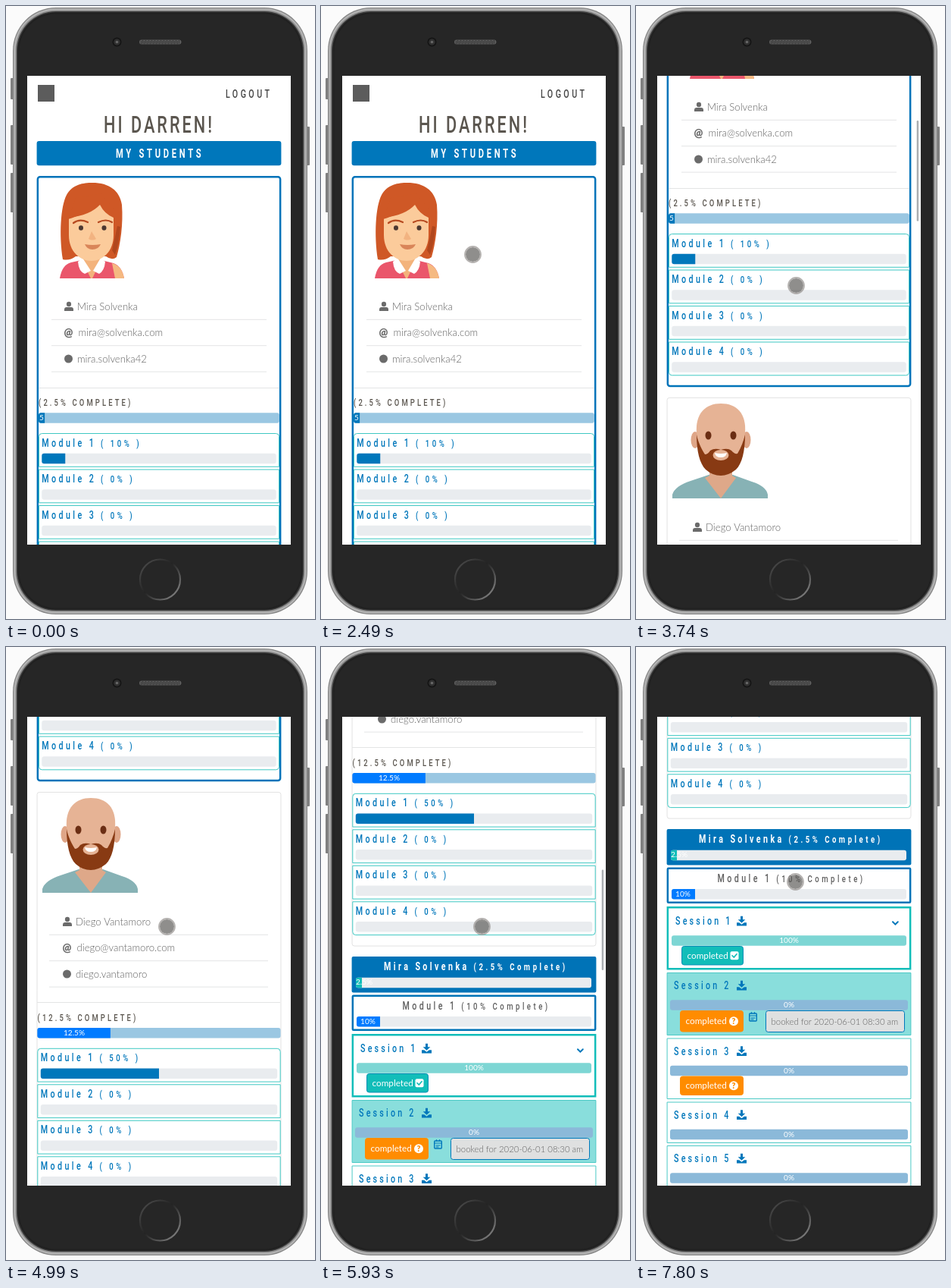
These frames come from a looping animation (408x808 px, 8000 ms). An HTML page with a canvas:

```html
<!DOCTYPE html>
<html lang="en">
<head>
<meta charset="utf-8">
<title>Student overview on a phone</title>
<style>
html, body { margin: 0; width: 100%; height: 100%; overflow: hidden; background: #fbfbfb; }
canvas { display: block; }
</style>
</head>
<body>
<canvas id="stage" width="408" height="808"></canvas>
<script>
const ctx = document.getElementById('stage').getContext('2d');
const LOOP = 8000;
const BLUE = '#0077bb', BRIGHT = '#007bff', TEAL = '#12bdb9', TRACK = '#e9ecef';
const PALE = '#9ac7e2', ORANGE = '#ff8c00', INK = '#5b564f', GREY = '#6b6b6b', SOFT = '#626262';
const CONDENSE = 0.7;
const LEFT = 40.6, WIDTH = 322.8;

// Each track holds its value until the next time.
const scrollTrack = [[0, 0], [2810, 84], [3120, 168], [3420, 252], [3740, 263], [4060, 420],
  [4360, 588], [5310, 672], [5620, 798], [5930, 924], [6240, 1008], [6550, 1092]];
const barTrack = [[0, 0], [2810, 1], [4680, 0.5], [4990, 0], [5310, 1], [6860, 0.5], [7180, 0]];
const cursorTrack = [[0, null], [610, [167.5, 367.5]], [930, [174.5, 193.5]], [1230, [178.5, 189.5]],
  [1550, [198.5, 187.5]], [1870, [224.5, 209.5]], [2170, [143.5, 282.5]], [2490, [200.5, 327.5]],
  [2810, [211.5, 368.5]], [4360, [212.5, 368.5]], [7180, [69.5, 322.5]], [7500, [57.5, 322.5]],
  [7800, [210.5, 309.5]]];

const valueAt = (track, t) => track.filter(step => step[0] <= t).pop()[1];

function box(x, y, w, h, r, fill, stroke, weight = 1) {
  ctx.beginPath();
  ctx.roundRect(x, y, w, h, r);
  if (fill) { ctx.fillStyle = fill; ctx.fill(); }
  if (stroke) { ctx.strokeStyle = stroke; ctx.lineWidth = weight; ctx.stroke(); }
}

// Full-width panel whose border lies inside its bounds.
function panel(y, h, r, fill, stroke, weight) {
  box(LEFT + weight / 2, y + weight / 2, WIDTH - weight, h - weight, r, fill, stroke, weight);
}

function oval(x, y, rx, ry, fill) {
  ctx.beginPath();
  ctx.ellipse(x, y, rx, ry, 0, 0, Math.PI * 2);
  ctx.fillStyle = fill;
  ctx.fill();
}

function shape(d, fill, x = 0, y = 0) {
  ctx.save();
  ctx.translate(x, y);
  ctx.fillStyle = fill;
  ctx.fill(new Path2D(d));
  ctx.restore();
}

function outline(d, color, weight, x = 0, y = 0) {
  ctx.save();
  ctx.translate(x, y);
  ctx.strokeStyle = color;
  ctx.lineWidth = weight;
  ctx.lineCap = 'round';
  ctx.stroke(new Path2D(d));
  ctx.restore();
}

// Condensed, widely tracked lettering; returns the advance.
function narrow(str, x, y, size, color, weight = 500, gap = 3.4) {
  ctx.save();
  ctx.translate(x, y);
  ctx.scale(CONDENSE, 1);
  ctx.font = `${weight} ${size}px Roboto, sans-serif`;
  ctx.letterSpacing = gap / CONDENSE + 'px';
  ctx.fillStyle = color;
  ctx.fillText(str, 0, 0);
  const advance = ctx.measureText(str).width * CONDENSE;
  ctx.restore();
  return advance;
}

function heading(label, note, x, y, color, weight = 500) {
  const advance = narrow(label, x, y, 15.3, color, weight);
  narrow(' ' + note, x + advance, y, 13.7, color, weight, 3.5);
}

function plain(str, x, y, size, color, weight = 300, align = 'left') {
  ctx.font = `${weight} ${size}px Lato, sans-serif`;
  ctx.textAlign = align;
  ctx.fillStyle = color;
  ctx.fillText(str, x, y);
  ctx.textAlign = 'left';
}

function rule(x1, x2, y) {
  ctx.fillStyle = '#e3e4e5';
  ctx.fillRect(x1, y - 0.5, x2 - x1, 1);
}

function progress(x, y, w, track, done = 0, color = BLUE) {
  box(x, y, w, 13.5, 3, track);
  if (done) box(x, y, done, 13.5, [3, 0, 0, 3], color);
}

function barLabel(str, x, y) {
  plain(str, x, y + 9.7, 10.1, '#fff', 400, 'center');
}

function contacts(x, y, lines, left, right) {
  shape('M0 12V10Q0 7 3 7H9Q12 7 12 10V12Z', GREY, x, y - 6);
  oval(x + 6, y - 3, 3.1, 3.2, GREY);
  plain('@', x - 0.5, y + 38.5, 14, GREY, 900);
  oval(x + 5.5, y + 69, 5.5, 5.5, GREY);
  lines.forEach((line, i) => {
    plain(line, x + (i === 1 ? 18.5 : 17), y + 4.7 + i * 34.5, 13.2, SOFT);
    rule(left, right, y + 17.3 + i * 34.4);
  });
}

function modules(x, y, w, pad, firstDone) {
  for (let i = 0; i < 4; i++) {
    const top = y + i * 47.5;
    const r = i === 0 ? [4, 4, 0, 0] : i === 3 ? [0, 0, 4, 4] : 0;
    box(x, top, w, 43.8, r, '#fff', '#3fc8c3', 1);
    heading('Module ' + (i + 1), `( ${i ? 0 : firstDone}% )`, x + pad, top + 17, BLUE);
    const barWidth = w - 2 * pad;
    progress(x + pad, top + 26.3, barWidth, TRACK, i ? 0 : barWidth * firstDone / 100);
  }
}

function woman() {
  shape('M75 334C70 302 72 264 80 249C88 235 102 233 114 233C136 233 150 243 153 262C155 288 151 314 146 331Q140 336 132 330H92Q84 336 75 334Z', '#cf5826');
  shape('M147 290L151 291Q150 312 144 328L140 322Z', '#b1471d');
  shape('M71 359Q74 341 86 338L104 334H122L142 339Q153 343 156 359Z', '#ea566b');
  shape('M144 359L140 339Q153 342 156 359Z', '#f5b981');
  shape('M102 322H125V336L114 359H112L101 337Z', '#f3b37c');
  shape('M101 332L112 349L104 353Q96 350 95 337ZM125 332L115 349L123 353Q130 349 131 337Z', '#fff');
  shape('M83 279Q111 276 124 262Q130 274 142 279V302C142 324 127 336 113 336C98 336 83 324 83 302Z', '#fbcb9b');
  shape('M82 281C95 277 111 271 124 259Q132 272 143 278V268L125 247L92 253Z', '#cf5826');
  outline('M89 286Q97 280 108 285M122 285Q132 280 140 285', '#b74a20', 2.2);
  oval(99, 292.5, 3, 3.3, '#4b3831');
  oval(129.5, 292.5, 3, 3.3, '#4b3831');
  shape('M113 297L109 307Q114 310 119 307Z', '#f2b381');
  shape('M104 314Q114 316 125 314Q122 321 114 321Q107 321 104 314Z', '#d98559');
}

function man() {
  shape('M48 324V319Q51 308 72 301L96 293H128L153 302Q172 308 174 319V324Z', '#87b2b5');
  shape('M97 278H127V294L132 297L112 324L91 297L97 294Z', '#dea889');
  oval(78, 247, 5.5, 11, '#dfa688');
  oval(146, 247, 5.5, 11, '#dfa688');
  shape('M80 238C78 212 92 199 112 199C133 199 146 212 144 238L139 274Q127 291 112 292Q96 291 85 274Z', '#e6b395');
  shape('M80 240C82 250 87 260 91 266Q95 266 98 261Q104 257 112 260Q121 257 126 261Q130 266 134 265C139 257 142 248 144 240C144 262 140 278 132 286Q122 294 112 294Q101 294 92 286C84 278 80 262 80 240Z', '#883a13');
  oval(112, 267, 10.5, 7, '#e6b395');
  shape('M104 264Q112 266 120 264Q119 270 112 270Q105 270 104 264Z', '#fff');
  oval(95.5, 241, 4, 5.6, '#6b2e14');
  oval(128.5, 241, 4, 5.6, '#6b2e14');
}

function doneButton(x, y, h, checked) {
  const right = 142;
  box(x + 0.5, y + 0.5, right - x - 1, h - 1, 3, checked ? TEAL : ORANGE, checked ? '#0b8fb5' : ORANGE);
  const mid = y + h / 2;
  plain('completed', x + 7.5, mid + 4, 11.76, '#fff', 400);
  if (checked) {
    box(124.5, mid - 5.5, 11, 11, 2, '#fff');
    outline('M127 0L129.3 2.3L133 -2', TEAL, 1.7, 0, mid);
  } else {
    oval(129, mid, 6, 6, '#fff');
    plain('?', 129, mid + 3.7, 10.5, ORANGE, 900, 'center');
  }
}

function session(n, y, h, { inset = 0, fill = '#fff', percent = 0, button = 0 } = {}) {
  panel(y, h, 0, fill, inset ? TEAL : '#4cc9c5', inset ? 2.5 : 1);
  const text = y + 22.2 + inset, bar = y + 36.3 + inset;
  narrow('Session ' + n, 50 + inset, text, 15.3, BLUE, 500, 3.2);
  shape('M5 0h3v4.5h3.3L6.5 9 1.7 4.5H5zM0 8.5h3.2l3.3 2.6 3.3-2.6H13v4.3H0z', BLUE, 133, text - 11.5);
  progress(45 + inset, bar, 314 - 2 * inset, percent ? '#7dd6d4' : '#8bb9d9');
  barLabel(percent + '%', 202, bar);
  if (button) doneButton(58 + inset, bar + 13.7, button, percent === 100);
}

function page() {
  box(42, 104, 22, 22, 0, '#5c5c5c');
  narrow('LOGOUT', 290, 121, 15.3, '#444');
  narrow('HI DARREN!', 129, 166.5, 31, INK, 500, 3);
  box(LEFT, 178, WIDTH, 32.3, 3, BLUE);
  narrow('MY STUDENTS', 145, 199.8, 16, '#fff', 700, 3.7);

  panel(224, 541.3, 3, '#fff', '#0073b9', 2.5);
  woman();
  contacts(77, 396, ['Mira Solvenka', 'mira@solvenka.com', 'mira.solvenka42'], 60, 344);
  rule(43, 361, 503.5);
  narrow('(2.5% COMPLETE)', 43, 527, 13.5, INK, 500, 3.1);
  progress(43.1, 536.3, 317.8, PALE, 8);
  barLabel('5', 47, 536.3);
  modules(43.5, 563.5, 317, 3.8, 10);

  panel(779, 539.5, 3, '#fff', '#dfdfdf', 0.9);
  ctx.save();
  ctx.translate(0, 588);
  man();
  ctx.restore();
  contacts(75, 950, ['Diego Vantamoro', 'diego@vantamoro.com', 'diego.vantamoro'], 57, 346);
  rule(41, 362, 1056.5);
  narrow('(12.5% COMPLETE)', 41.5, 1081, 13.5, INK, 500, 3.1);
  progress(41.4, 1090, 321.2, PALE, 96.5, BRIGHT);
  barLabel('12.5%', 90, 1090);
  modules(41.8, 1117.3, 320.4, 4, 50);

  box(LEFT, 1332, WIDTH, 47.5, 2, '#0073b7');
  heading('Mira Solvenka', '(2.5% Complete)', 83, 1350.3, '#fff', 700);
  progress(46, 1359.7, 311, TRACK, 8, TEAL);
  barLabel('2.5%', 57, 1359.7);
  panel(1382.5, 47.5, 1, '#fff', '#0073b7', 2.5);
  heading('Module 1', '(10% Complete)', 107.5, 1402.3, '#5f5f5f');
  progress(47, 1411, 310, TRACK, 31, BRIGHT);
  barLabel('10%', 62, 1411);

  session(1, 1434, 83.5, { inset: 2, percent: 100, button: 25.5 });
  outline('M339 1454.3L342.4 1457.7L345.8 1454.3', BLUE, 2);
  session(2, 1521, 83, { fill: '#89dedc', button: 28.5 });
  box(149.7, 1575, 9.6, 10, 1, null, BLUE, 1.4);
  outline('M150 1578H159M152.5 1573.5V1575M156.5 1573.5V1575M152 1581H157M152 1583H155', BLUE, 1.2);
  box(171.5, 1571.5, 183, 28, 3, '#dfe0e0', BLUE);
  plain('booked for 2020-06-01 08:30 am', 178.5, 1589.7, 11.4, SOFT);
  session(3, 1607.5, 80.5, { button: 25.5 });
  session(4, 1691.5, 54.5);
  session(5, 1749, 54.5);
}

function phone() {
  ctx.fillStyle = '#fbfbfb';
  ctx.fillRect(0, 0, 408, 808);
  for (const [y, h] of [[95, 28], [157, 52], [220, 52]]) box(6, y, 4, h, 1, '#808080');
  box(396, 159, 5, 51, 1, '#808080');
  const rim = [[0, '#858585'], [1.2, '#b4b4b4'], [3.4, '#8c8c8c'], [5, '#3a3a3a'], [6.5, '#202020'], [8.5, '#262626']];
  for (const [d, color] of rim) box(9 + d, 2 + d, 389 - 2 * d, 800 - 2 * d, 57 - d, color);

  oval(146.5, 47.5, 6, 6, '#141414');
  oval(146.5, 47.5, 4.3, 4.3, '#303030');
  oval(146.5, 47.5, 1.8, 1.8, '#666');
  box(176, 44.5, 55.5, 6, 3, '#5a5a5a');
  ctx.fillStyle = '#393939';
  for (let x = 178; x < 230; x += 2) ctx.fillRect(x, 45 + x / 2 % 2, 1, 4.5);

  const ring = ctx.createLinearGradient(182, 736, 225, 776);
  ring.addColorStop(0, '#484848');
  ring.addColorStop(0.45, '#232323');
  ring.addColorStop(1, '#7d7d7d');
  ctx.beginPath();
  ctx.arc(203.5, 756, 26.5, 0, Math.PI * 2);
  ctx.strokeStyle = ring;
  ctx.lineWidth = 2.2;
  ctx.stroke();
}

function draw(t) {
  phone();
  const scroll = valueAt(scrollTrack, t);
  ctx.save();
  ctx.beginPath();
  ctx.rect(28, 92, 348, 618);
  ctx.clip();
  ctx.fillStyle = '#fff';
  ctx.fillRect(28, 92, 348, 618);
  ctx.translate(0, -scroll);
  page();
  ctx.restore();

  ctx.globalAlpha = valueAt(barTrack, t);
  box(370.7, 94.4 + scroll * 0.2155, 2.4, 132.5, 1.2, '#a9adb1');
  ctx.globalAlpha = 1;

  const cursor = valueAt(cursorTrack, t);
  if (cursor) {
    oval(cursor[0], cursor[1], 9.5, 9.5, 'rgba(85,83,81,.66)');
    ctx.beginPath();
    ctx.arc(cursor[0], cursor[1], 10.4, 0, Math.PI * 2);
    ctx.strokeStyle = 'rgba(150,146,142,.7)';
    ctx.lineWidth = 2;
    ctx.stroke();
  }
}

const start = performance.now();
function tick() {
  draw((performance.now() - start) % LOOP);
  requestAnimationFrame(tick);
}
tick();
</script>
</body>
</html>
```
